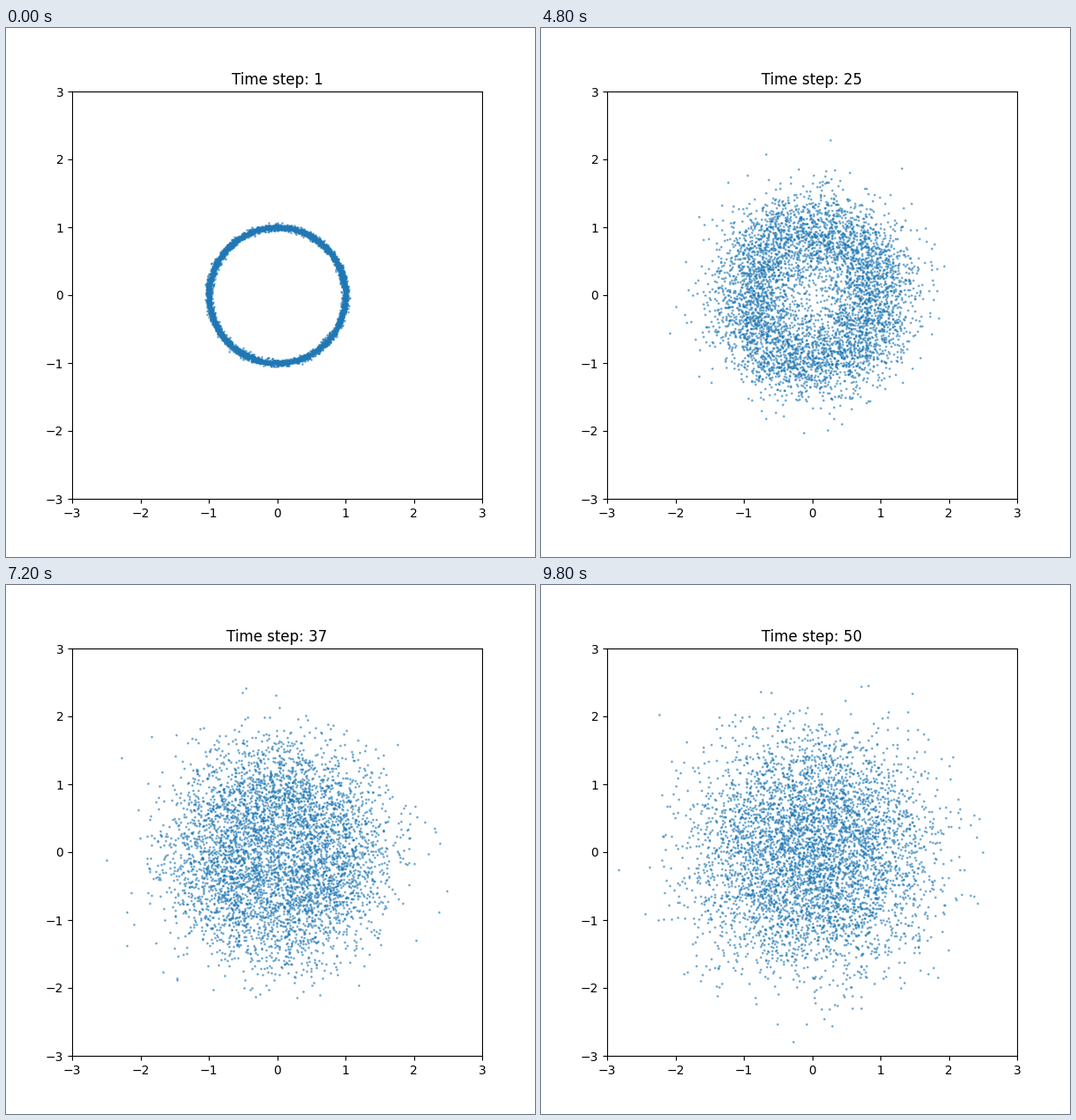
Animation, 600 px wide and 600 px high, one loop 10 s. Source, as a matplotlib script:

```python
import numpy as np
import matplotlib.pyplot as plt
from matplotlib.animation import FuncAnimation

STEPS = 50
COUNT = 5000
INTERVAL = 200  # ms


def noisy_circle(rng):
    angle = 2 * np.pi * rng.rand(COUNT)
    ring = np.column_stack([np.cos(angle), np.sin(angle)])
    return ring + 0.02 * rng.randn(COUNT, 2)


def diffuse(rng):
    """Forward diffusion with a linear noise schedule."""
    points = noisy_circle(rng)
    path = []
    for beta in np.linspace(1e-4, 0.02, STEPS):
        noise = rng.randn(COUNT, 2)
        points = np.sqrt(1 - beta) * points + np.sqrt(beta) * noise
        path.append(points)
    return path


path = diffuse(np.random.RandomState(42))
fig, ax = plt.subplots(figsize=(6, 6), dpi=100)


def update(step):
    ax.clear()
    ax.scatter(*path[step].T, s=1, alpha=0.5)
    ax.set_xlim(-3, 3)
    ax.set_ylim(-3, 3)
    ax.set_title(f"Time step: {step + 1}")


anim = FuncAnimation(fig, update, frames=STEPS, interval=INTERVAL,
                     init_func=lambda: update(0), repeat=True, repeat_delay=0)
plt.show()
```
